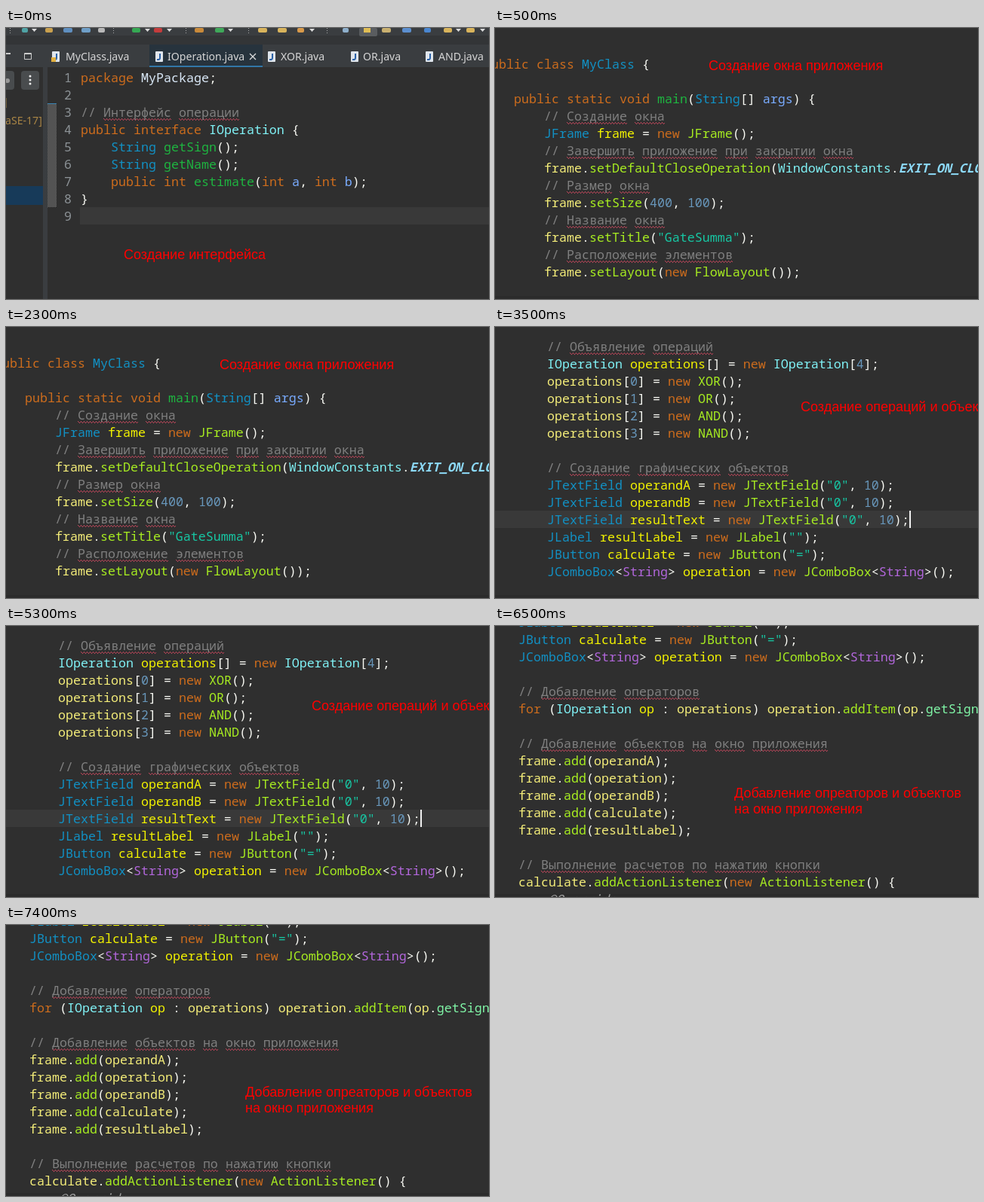
Recreate the animation shown at these times as an HTML page. Size 640 px wide and 360 px high, loop 8 s.

```html
<!DOCTYPE html>
<html lang="ru">
<head>
<meta charset="utf-8">
<style>
html, body { margin: 0; width: 100%; height: 100%; overflow: hidden; background: #2f2f2f; }
.scene { position: absolute; left: 0; top: 0; width: 640px; height: 360px; overflow: hidden; background: #2f2f2f; }
.scene > * { position: absolute; margin: 0; }
.code { font: 16.667px/23px "Noto Sans Mono", monospace; color: #f9faf4; white-space: pre; }
.caption { font: 18px/21px "Liberation Sans", Arial, sans-serif; color: #f00; white-space: pre; }
.row { height: 23px; right: 0; background: #393939; }
.caret { width: 2px; height: 23px; background: #f0f0f0; }
.strip { left: 0; top: 356px; width: 640px; height: 4px; background: #2b2b2b; }
.typo {
  --dot: linear-gradient(90deg, #c4475c 1px, #0000 0);
  background: var(--dot) 0 20px / 4px 1px repeat-x, var(--dot) 1px 21px / 2px 1px repeat-x,
    var(--dot) 2px 22px / 4px 1px repeat-x;
}
.comment { color: #808080; }
.string { color: #17c6a3; }
.note { color: #a0a0a0; font-style: italic; }
.constant { color: #8ddaf8; font-weight: bold; font-style: italic; }
.keyword { color: #cc6c1d; }
.package { color: #d9e8f7; }
.generic { color: #b166da; }
.interface { color: #80f2f6; }
.abstract { color: #80f6a7; }
.call { color: #a7ec21; }
.method { color: #1eb540; }
.type { color: #1290c3; }
.param { color: #79abff; }
.number { color: #6897bb; }
.declared { color: #f2f200; }
.local { color: #f3ec79; }
svg text { font: 14.1px "Noto Sans", sans-serif; }
</style>
</head>
<body>
<script>
const rules = {
  comment: /\/\/.*/,
  string: /"[^"]*"/,
  note: /@\w+/,
  constant: /EXIT_\w+/,
  keyword: /\b(?:package|public|interface|class|static|void|int|new|for)\b/,
  package: /(?<=package )\w+/,
  generic: /(?<=<)\w+/,
  interface: /\b(?:IOperation|WindowConstants)\b/,
  abstract: /(?<=op\.)\w+/,
  call: /(?<=new |\.)\w+(?=[(<])/,
  method: /\w+(?=\()/,
  type: /\b[A-Z]\w*/,
  param: /\b(?:a|b|args)\b/,
  number: /\b\d+/,
  declared: /(?<=[\w>] )\w+(?= =|\[\]| :)/,
  local: /\b[a-z]\w*/
};
const lexer = new RegExp(Object.entries(rules).map(([name, re]) => `(?<${name}>${re.source})`).join("|"), "g");

const escapeHtml = s => s.replace(/</g, "&lt;").replace(/>/g, "&gt;");

function highlight(code) {
  let html = "", end = 0;
  for (const m of code.matchAll(lexer)) {
    const kind = Object.keys(rules).find(k => m.groups[k] !== undefined);
    let text = escapeHtml(m[0]);
    if (kind === "comment") text = text.replace(/[а-яё]+/gi, '<span class="typo">$&</span>');
    html += escapeHtml(code.slice(end, m.index)) + `<span class="${kind}">${text}</span>`;
    end = m.index + m[0].length;
  }
  return html + escapeHtml(code.slice(end));
}

const at = (cls, x, y, html = "") => `<div class="${cls}" style="left:${x}px;top:${y}px">${html}</div>`;
const code = (x, y, text) => at("code", x, y, highlight(text));
const rect = (x, y, w, h, fill, extra = "") =>
  `<rect x="${x}" y="${y}" width="${w}" height="${h}" fill="${fill}" ${extra}/>`;
const label = (x, y, text, fill) => `<text x="${x}" y="${y}" fill="${fill}">${text}</text>`;

function fileTab(iconX, textX, name) {
  return rect(iconX, 31, 10, 14, "#dfe5ec", 'rx="1"') +
    `<path d="M${iconX + 6} 34v6q0 2.5-4 2" fill="none" stroke="#2b62a8" stroke-width="2"/>` +
    label(textX, 43, name, "#d6d6d6");
}

function ideFrame() {
  const icons = [
    [21, 8, "#4fa3a5"], [52, 10, "#c9a04e"], [76, 12, "#5f8fc0"], [100, 12, "#6f9fc8"], [122, 9, "#b9b9b9"],
    [167, 11, "#35a853"], [196, 11, "#c43c3c"], [250, 12, "#c98a3a"], [277, 12, "#3fa85a"],
    [334, 12, "#d9b45c"], [360, 12, "#d9b45c"], [386, 9, "#d99a4a"], [446, 8, "#8fb0cc"],
    [498, 12, "#c9b070"], [525, 12, "#5c8fd0"], [554, 9, "#4a86d0"], [580, 11, "#d9b45c"], [610, 11, "#d9b45c"]
  ];
  const dots = [5, 142, 238, 321, 425].map(x => rect(x, 0, 1, 1, "#aaa") + rect(x, 3, 1, 1, "#aaa") + rect(x, 6, 1, 1, "#aaa"));
  const arrows = [34, 184, 213, 294, 402, 596, 628].map(x => `<path d="M${x} 1h7l-3.5 4z" fill="#ddd"/>`);
  const tabs = [
    [61, 79, "MyClass.java"], [198, 214, "IOperation.java"], [347, 364, "XOR.java"],
    [457, 473, "OR.java"], [556, 573, "AND.java"]
  ];
  return `<svg width="640" height="360">
    <pattern id="hatch" width="2" height="2" patternUnits="userSpaceOnUse">
      ${rect(0, 0, 1, 1, "#777")}${rect(1, 1, 1, 1, "#777")}
    </pattern>` +
    rect(0, 0, 640, 52, "#3a3d40") + rect(0, 10, 640, 12, "#333537") +
    rect(0, 52, 49, 34, "#2f2f2f") + rect(49, 22, 6, 338, "#3a3d40") +
    rect(468, 0, 24, 11, "#5a5d60", 'rx="2"') + rect(474, 0, 9, 6, "#e0bd55") +
    icons.map(([x, w, fill]) => rect(x, 0, w, 6, fill, 'rx="2"')).join("") +
    dots.join("") + arrows.join("") +
    rect(190, 22, 150, 30, "#27333d") + rect(190, 50, 150, 2, "#3277a8") +
    tabs.map(tab => fileTab(...tab)).join("") +
    rect(60, 39, 6, 6, "#e2b040") +
    `<path d="M323 34l8 8m0-8l-8 8" stroke="#ddd" stroke-width="1.3"/>` +
    rect(0, 33, 6, 2, "#ccc") +
    `<path d="M24.5 33.5h9v8h-9zM24 34.5h10" fill="none" stroke="#ccc"/>` +
    rect(-8, 57, 19, 25, "#494c4e", 'rx="4"') + rect(20, 57, 24, 25, "#494c4e", 'rx="4"') +
    `<circle cx="2" cy="70" r="3" fill="#999"/>` +
    [64, 69, 74].map(y => `<circle cx="32" cy="${y}" r="1.5" fill="#eee"/>`).join("") +
    label(-3, 103, "]", "#a98545") + label(-1, 128, "aSE-17]", "#a98545") +
    rect(0, 210, 49, 25, "#173a59") +
    rect(55, 100, 12, 1, "#3a86b5") + rect(55, 101, 12, 137, "url(#hatch)") + "</svg>";
}

const scenes = [
  { until: 500, html: ideFrame() + at("row", 98, 238) +
    at("code", 77, 54, `<span style="color:#8c9296">${[1, 2, 3, 4, 5, 6, 7, 8, 9].join("\n")}</span>`) +
    code(99, 54, `package MyPackage;

// Интерфейс операции
public interface IOperation {
    String getSign();
    String getName();
    public int estimate(int a, int b);
}`) + at("caption", 156, 291, "Создание интерфейса") },

  { until: 3500, html: at("strip", 0, 356) + code(-15, 36, `public class MyClass {

    public static void main(String[] args) {
        // Создание окна
        JFrame frame = new JFrame();
        // Завершить приложение при закрытии окна
        frame.setDefaultCloseOperation(WindowConstants.EXIT_ON_CLOSE);
        // Размер окна
        frame.setSize(400, 100);
        // Название окна
        frame.setTitle("GateSumma");
        // Расположение элементов
        frame.setLayout(new FlowLayout());`) + at("caption", 283, 40, "Создание окна приложения") },

  { until: 6500, html: at("strip", 0, 356) + at("row", 0, 244) + code(69, 14, `// Объявление операций
IOperation operations[] = new IOperation[4];
operations[0] = new XOR();
operations[1] = new OR();
operations[2] = new AND();
operations[3] = new NAND();

// Создание графических объектов
JTextField operandA = new JTextField("0", 10);
JTextField operandB = new JTextField("0", 10);
JTextField resultText = new JTextField("0", 10);
JLabel resultLabel = new JLabel("");
JButton calculate = new JButton("=");
JComboBox<String> operation = new JComboBox<String>();`) +
    at("caret", 549, 244) + at("caption", 405, 96, "Создание операций и объектов") },

  { until: 8000, html: at("strip", 0, 356) + code(31, -17, `JLabel resultLabel = new JLabel("");
JButton calculate = new JButton("=");
JComboBox<String> operation = new JComboBox<String>();

// Добавление операторов
for (IOperation op : operations) operation.addItem(op.getSign());

// Добавление объектов на окно приложения
frame.add(operandA);
frame.add(operation);
frame.add(operandB);
frame.add(calculate);
frame.add(resultLabel);

// Выполнение расчетов по нажатию кнопки
calculate.addActionListener(new ActionListener() {
    @Override`) + at("caption", 317, 212, "Добавление опреаторов и объектов\nна окно приложения") }
];

for (const scene of scenes) {
  scene.node = document.createElement("div");
  scene.node.className = "scene";
  scene.node.innerHTML = scene.html;
  document.body.append(scene.node);
}

const start = performance.now();
function tick() {
  const time = (performance.now() - start) % 8000;
  const current = scenes.find(s => time < s.until);
  for (const s of scenes) s.node.style.visibility = s === current ? "visible" : "hidden";
  requestAnimationFrame(tick);
}
tick();
</script>
</body>
</html>
```
